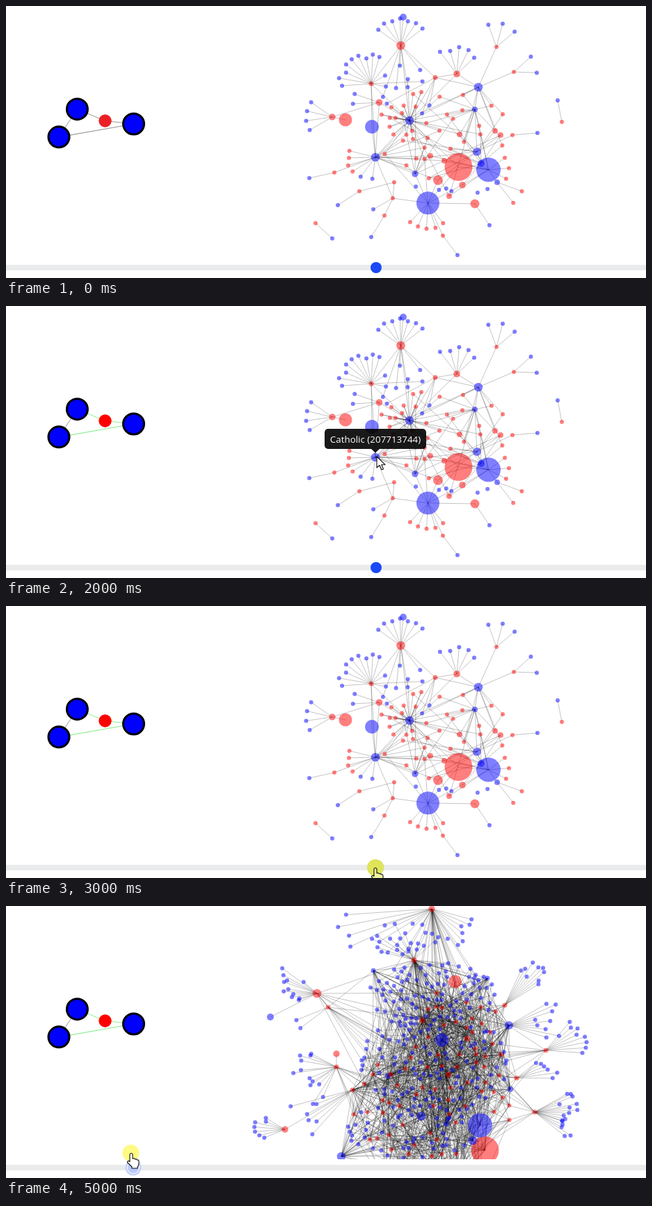
Recreate the animation shown at these times as an HTML page with a canvas. Size 920 by 392 pixels, loop 6 s.

```html
<!DOCTYPE html>
<html lang="en">
<head>
<meta charset="utf-8">
<title>Network over time</title>
<style>
html, body { margin: 0; width: 100%; height: 100%; overflow: hidden; background: #fff; }
canvas { display: block; }
</style>
</head>
<body>
<canvas id="stage" width="920" height="392"></canvas>
<script>
const ctx = document.getElementById('stage').getContext('2d');
const RED = 'rgba(255,0,0,.5)', BLUE = 'rgba(0,0,255,.5)';
const STEP = 1000, LOOP = 6000;

function seeded(seed) {
  return () => {
    seed = (seed + 0x6D2B79F5) | 0;
    let t = Math.imul(seed ^ (seed >>> 15), 1 | seed);
    t = (t + Math.imul(t ^ (t >>> 7), 61 | t)) ^ t;
    return ((t ^ (t >>> 14)) >>> 0) / 4294967296;
  };
}

const gap = (a, b) => Math.hypot(a.x - b.x, a.y - b.y);

class Graph {
  constructor(seed) {
    this.rnd = seeded(seed);
    this.nodes = [];
    this.edges = [];
  }

  dot(color, r, x, y) {
    const node = { color, r, x, y };
    this.nodes.push(node);
    return node;
  }

  link(hub, ...others) {
    for (const other of others) this.edges.push([hub, other]);
  }

  // n leaves around a hub, spread over an arc given in degrees
  fan(hub, color, n, from, to, near, far) {
    for (let i = 0; i < n; i++) {
      const jitter = n > 9 ? this.rnd() - 0.5 : 0;
      const a = (from + (to - from) * (i + jitter) / (n - 1)) * Math.PI / 180;
      const d = near + (far - near) * this.rnd();
      this.link(hub, this.dot(color, 3, hub.x + d * Math.cos(a), hub.y + d * Math.sin(a)));
    }
  }

  // n dots in an ellipse, each at the roomiest of a few random places
  cloud(color, n, cx, cy, rx, ry) {
    const place = () => {
      const a = this.rnd() * Math.PI * 2, d = Math.sqrt(this.rnd());
      const p = { x: cx + rx * d * Math.cos(a), y: cy + ry * d * Math.sin(a) };
      p.room = Math.min(...this.nodes.map(q => gap(p, q) - q.r));
      return p;
    };
    return Array.from({ length: n }, () => {
      const best = [1, 2, 3, 4].map(place).sort((a, b) => b.room - a.room)[0];
      return this.dot(color, 3, best.x, best.y);
    });
  }

  // join each node to k different hubs, close ones being likelier
  weave(nodes, hubs, k, reach) {
    for (const node of nodes) {
      const ranked = hubs.filter(h => h !== node)
        .map(h => ({ h, rank: gap(node, h) / reach + Math.log(-Math.log(this.rnd())) }))
        .sort((a, b) => a.rank - b.rank);
      this.link(node, ...ranked.slice(0, k).map(e => e.h));
    }
  }
}

function sparseGraph() {
  const g = new Graph(5);
  const top = g.dot(RED, 6.3, 567.5, 57), nw = g.dot(RED, 3.5, 525, 112), north = g.dot(RED, 4.8, 648, 98);
  const side = g.dot(RED, 4.7, 469, 160), inner = g.dot(RED, 4.8, 536.5, 139), bridge = g.dot(RED, 3.5, 617, 103);
  const ne = g.dot(RED, 3, 705, 59), ne2 = g.dot(RED, 3, 730, 95), east = g.dot(RED, 3, 728, 186);
  const coral = g.dot(RED, 9.5, 488, 164), low = g.dot(RED, 3, 556, 277), se = g.dot(RED, 6.5, 674, 285);
  const mids = [g.dot(RED, 7, 621, 251), g.dot(RED, 4.8, 656, 258), g.dot(RED, 4, 637, 274), g.dot(RED, 4, 630, 223),
    g.dot(RED, 4, 610, 216), g.dot(RED, 4, 652, 185), g.dot(RED, 4, 703, 180), g.dot(RED, 4, 711, 186)];
  const sun = g.dot(RED, 20, 650.5, 232);
  const core = g.dot(BLUE, 6.3, 580, 165), west = g.dot(BLUE, 6.3, 531, 218), right = g.dot(BLUE, 6.3, 679, 117);
  const fork = g.dot(BLUE, 4, 674, 149), knot = g.dot(BLUE, 6, 677, 210), dark = g.dot(BLUE, 5, 683, 227);
  const ball = g.dot(BLUE, 10, 526, 174), south = g.dot(BLUE, 16.5, 606.5, 284), moon = g.dot(BLUE, 17.5, 693.5, 236);
  const small = g.dot(BLUE, 4.7, 588, 242), tail = g.dot(BLUE, 4, 706, 254), tip = g.dot(BLUE, 5, 571, 16);

  g.fan(top, BLUE, 7, -145, -38, 36, 41);
  g.fan(nw, BLUE, 9, -184, -73, 37, 48);
  g.fan(north, BLUE, 5, -127, -43, 32, 41);
  g.fan(ne, BLUE, 3, -110, -40, 34, 35);
  g.fan(ne2, BLUE, 2, -42, 2, 33, 33);
  g.fan(side, BLUE, 4, 150, 215, 37, 38);
  g.fan(inner, BLUE, 2, 177, 199, 37, 38);
  g.fan(west, RED, 4, 148, 194, 37, 41);
  g.fan(west, BLUE, 2, 98, 127, 30, 36);
  g.fan(moon, RED, 3, -36, 27, 27, 30);
  g.fan(tail, RED, 2, 20, 52, 37, 38);
  g.fan(south, RED, 5, 53, 133, 36, 38);

  const strand = (from, colors, ...points) => points.reduce((prev, [x, y], i) => {
    const next = g.dot(colors[i], 3, x, y);
    if (prev) g.link(prev, next);
    return next;
  }, from);
  strand(west, [RED, BLUE], [472, 240], [436, 248]);
  strand(low, [RED, BLUE], [544, 302], [525, 333]);
  strand(low, [BLUE], [528, 293]);
  strand(low, [RED, RED, BLUE], [558, 254], [508, 267], [477, 287]);
  strand(south, [RED, BLUE], [628, 331], [649, 359]);
  strand(se, [BLUE], [695, 316]);
  strand(east, [BLUE], [764, 183]);
  strand(null, [RED, BLUE], [445, 313], [469, 335]);
  strand(null, [BLUE, RED], [793, 136], [799, 167]);

  const hubs = [core, core, west, right, fork, knot, dark, south, moon, small];
  g.weave(g.cloud(RED, 36, 630, 184, 98, 74), hubs, 2, 40);
  g.weave(g.cloud(BLUE, 12, 573, 133, 42, 58), [core, top, nw, bridge], 1, 40);
  g.cloud(BLUE, 6, 630, 262, 64, 28);
  g.weave(mids, hubs, 3, 45);
  g.link(core, top, nw, inner, bridge, sun, west, right, north);
  g.link(west, nw, ball, low, small, inner);
  g.link(nw, top, ball);
  g.link(south, low, se, sun, small);
  g.link(right, ne, ne2, north, bridge, fork);
  g.link(knot, east, fork, dark);
  g.link(top, tip, bridge);
  g.link(side, coral, inner);
  g.link(bridge, north);
  g.link(moon, fork, tail, sun);
  return g;
}

function mediumGraph() {
  const g = new Graph(24);
  const top = g.dot(RED, 4.7, 602.5, 41), nw = g.dot(RED, 6.3, 511, 84), west = g.dot(RED, 3.3, 504, 140);
  const tail = g.dot(RED, 4.7, 442, 224), mid = g.dot(RED, 4.5, 486, 170), spot = g.dot(RED, 4, 619, 142);
  const sun = g.dot(RED, 20, 663.5, 298), east = g.dot(RED, 3, 760, 263);
  const reds = [spot, g.dot(RED, 9.5, 519.5, 150), g.dot(RED, 7, 652, 306), g.dot(RED, 6.5, 693, 347),
    g.dot(RED, 4.7, 677, 309), g.dot(RED, 4, 634, 360), g.dot(RED, 4, 646, 178), g.dot(RED, 3, 460, 227)];
  const core = g.dot(BLUE, 6.3, 576, 223), sw = g.dot(BLUE, 6.3, 506, 260), ne = g.dot(BLUE, 6, 709, 152);
  const south = g.dot(BLUE, 16.5, 587.5, 341), moon = g.dot(BLUE, 17.5, 703.5, 250), ball = g.dot(BLUE, 10, 560.5, 160);
  const right = g.dot(BLUE, 3.2, 733, 211), pale = g.dot(BLUE, 5, 464, 29);
  const knots = [g.dot(BLUE, 4.7, 579, 299), g.dot(BLUE, 4.7, 681, 232), g.dot(BLUE, 5, 683, 239),
    g.dot(BLUE, 4.7, 700, 320), g.dot(BLUE, 4, 633, 238), g.dot(BLUE, 3.5, 611, 249)];

  g.fan(top, BLUE, 36, -190, 45, 34, 62);
  g.fan(nw, BLUE, 10, -160, -45, 34, 57);
  g.fan(west, BLUE, 13, 150, 232, 28, 60);
  g.fan(tail, BLUE, 7, 130, 215, 30, 46);
  g.fan(ne, RED, 5, -60, -22, 46, 60);
  g.fan(east, BLUE, 3, -16, 80, 18, 31);
  g.fan(right, BLUE, 2, -17, -32, 39, 81);
  g.fan(sw, RED, 2, 141, 176, 40, 64);
  g.fan(sw, BLUE, 3, 86, 112, 42, 98);

  const hubs = [core, core, sw, ne, south, moon, right, ...knots];
  const red = g.cloud(RED, 46, 596, 256, 116, 82);
  g.weave(red, hubs, 3, 80);
  g.weave(g.cloud(RED, 10, 640, 160, 90, 65), hubs, 2, 90);
  g.weave(g.cloud(BLUE, 46, 606, 113, 72, 43), [top, spot, core, ball, ne, west, nw], 2, 60);
  g.weave(g.cloud(BLUE, 42, 606, 236, 112, 110), [...hubs, ...reds, ...red], 2, 60);
  g.weave([top, nw, west, mid, spot, sun, ...reds], hubs, 4, 110);
  g.weave(hubs, [...hubs, ...red], 4, 110);
  g.link(tail, reds[7]);
  g.link(core, reds[7]);
  g.link(moon, east);
  g.link(nw, pale, top);
  return g;
}

function denseGraph() {
  const g = new Graph(77);
  const top = g.dot(RED, 4.7, 612, 4), crown = g.dot(RED, 4, 586.5, 78), nw = g.dot(RED, 6.3, 447, 126);
  const nw2 = g.dot(RED, 3.3, 463, 146), west = g.dot(RED, 3.5, 475, 232), sw = g.dot(RED, 4.7, 401, 322);
  const se = g.dot(RED, 3.5, 760, 297), east = g.dot(RED, 3.5, 776, 208), east2 = g.dot(RED, 3.5, 734, 248);
  const ne = g.dot(RED, 3.5, 717, 143), left = g.dot(RED, 3.3, 498, 265), spot = g.dot(RED, 4, 598.5, 165);
  const sun = g.dot(RED, 20, 688.5, 352), coral = g.dot(RED, 9.5, 645.5, 109), pink = g.dot(RED, 4.7, 475, 213);
  const ne2 = g.dot(BLUE, 6, 723, 172), ball = g.dot(BLUE, 10, 626.5, 193), moon = g.dot(BLUE, 17.5, 681.5, 316);
  const pale = g.dot(BLUE, 5, 380, 160), corner = g.dot(BLUE, 6.3, 482, 361);
  const knots = [g.dot(BLUE, 6.3, 597, 303), g.dot(BLUE, 6.3, 671, 338), g.dot(BLUE, 4.2, 549, 245),
    g.dot(BLUE, 4, 633, 314), g.dot(BLUE, 4, 725, 264), g.dot(BLUE, 3.5, 528, 93), g.dot(BLUE, 3.5, 692, 104),
    g.dot(RED, 4, 636, 243), g.dot(RED, 4, 663, 191), g.dot(RED, 3.5, 712, 214), g.dot(RED, 3.5, 553, 243)];
  // these lie under the lower edge of the plot
  const below = g.cloud(BLUE, 8, 620, 400, 90, 16);

  g.fan(top, BLUE, 4, 155, 176, 100, 146);
  g.fan(top, BLUE, 7, 15, 62, 28, 88);
  g.fan(nw, BLUE, 11, 160, 222, 25, 62);
  g.fan(nw2, BLUE, 2, 143, 158, 49, 50);
  g.fan(west, BLUE, 12, 118, 212, 32, 70);
  g.fan(sw, BLUE, 7, 158, 211, 28, 49);
  g.fan(left, BLUE, 6, 132, 165, 55, 95);
  g.fan(ne, BLUE, 9, -65, -32, 48, 80);
  g.fan(ne2, BLUE, 9, -30, 18, 38, 76);
  g.fan(east, BLUE, 8, -50, 4, 42, 60);
  g.fan(east2, BLUE, 6, -38, 0, 24, 63);
  g.fan(se, BLUE, 16, -30, 38, 35, 68);

  const hubs = [spot, ball, crown, ne2, moon, sun, left, corner, ...knots, ...below];
  const red = [...g.cloud(RED, 48, 612, 290, 118, 82), ...g.cloud(RED, 22, 650, 175, 72, 68)];
  const all = [...hubs, ...red];
  g.weave(red, [...hubs, ...below], 5, 110);
  g.weave(g.cloud(BLUE, 26, 574, 48, 50, 25), [crown, top], 1, 60);
  g.weave(g.cloud(BLUE, 78, 612, 130, 92, 50), [...all, top, crown, spot], 3, 65);
  g.weave(g.cloud(BLUE, 100, 615, 228, 108, 78), all, 3, 75);
  g.weave(g.cloud(BLUE, 44, 590, 322, 105, 44), all, 3, 75);
  g.weave([...hubs, coral], all, 6, 120);
  g.weave([top, crown, spot, ball], all, 22, 160);
  g.weave([nw, nw2, west, left, east, east2, se, ne, ne2, corner], all, 9, 110);
  g.link(nw, nw2, pale);
  g.link(west, pink);
  g.link(left, sw);
  return g;
}

function disc(x, y, r, fill, stroke, width) {
  ctx.beginPath();
  ctx.arc(x, y, r, 0, Math.PI * 2);
  ctx.fillStyle = fill;
  ctx.fill();
  if (stroke) {
    ctx.strokeStyle = stroke;
    ctx.lineWidth = width;
    ctx.stroke();
  }
}

function line(a, b, color, width) {
  ctx.beginPath();
  ctx.moveTo(a.x, a.y);
  ctx.lineTo(b.x, b.y);
  ctx.strokeStyle = color;
  ctx.lineWidth = width;
  ctx.stroke();
}

function drawGraph({ nodes, edges }) {
  ctx.save();
  ctx.beginPath();
  ctx.rect(300, 0, 620, 365);
  ctx.clip();
  for (const [a, b] of edges) line(a, b, 'rgba(0,0,0,.34)', 0.7);
  for (const n of nodes) disc(n.x, n.y, n.r, n.color);
  ctx.restore();
}

function drawSmallNet(active) {
  const a = { x: 102.4, y: 148.7 }, b = { x: 76, y: 188.8 }, c = { x: 183.5, y: 170 }, m = { x: 142.5, y: 165.5 };
  const hot = active ? '#90ee90' : '#999';
  line(a, b, '#999', 1);
  line(a, m, hot, 1);
  line(m, c, hot, 1);
  line(b, c, hot, 1.2);
  for (const p of [a, b, c]) disc(p.x, p.y, 15, '#00f', '#000', 3);
  disc(m.x, m.y, 9.2, active ? '#f00' : '#ec2024');
}

function drawTip({ x, y, w, text, arrow }) {
  ctx.fillStyle = 'rgba(0,0,0,.9)';
  ctx.beginPath();
  ctx.roundRect(x, y, w, 29, 5);
  ctx.fill();
  ctx.fill(new Path2D(arrow));
  ctx.fillStyle = '#fff';
  ctx.font = '13.4px "Open Sans", sans-serif';
  ctx.textAlign = 'center';
  ctx.fillText(text, x + w / 2, y + 20);
}

const ARROW = new Path2D('M0 0V16L4 12.5L7 19L9.5 18L6.8 11.7H12Z');
const HAND = new Path2D('M-2 2Q0 -1.5 2 2V8Q4 7 5.500 9Q7.500 8 8.500 10Q11 9.500 11 12V15Q11 18 9 20V22H1V20Q-2 17 -5.500 13.500Q-5.500 11 -3 11.500L-2 12.500Z');

function drawCursor(shape, x, y, fill = '#fff') {
  ctx.save();
  ctx.translate(x, y);
  ctx.fillStyle = fill;
  ctx.strokeStyle = '#111';
  ctx.lineWidth = 1.1;
  ctx.lineJoin = 'round';
  ctx.fill(shape);
  ctx.stroke(shape);
  ctx.restore();
}

function drawSlider(x, pressed) {
  ctx.fillStyle = '#e9ebed';
  ctx.fillRect(0, 373, 920, 8);
  if (pressed) {
    disc(x, 377, 11.5, '#c6d1f8');
    disc(x, 377, 9, '#fff');
  }
  disc(x, 377, 8, pressed ? '#b9c7fa' : '#1a49f5');
}

const sparse = sparseGraph(), medium = mediumGraph(), dense = denseGraph();
const scenes = [
  { graph: sparse, knob: 532 },
  { graph: sparse, knob: 532, arrow: [191, 167],
    tip: { x: 92, y: 156, w: 71, text: 'VELIR (5)', arrow: 'M163 164.5L168.5 170.5L163 176.5Z' } },
  { graph: sparse, knob: 532, active: true, arrow: [533, 217],
    tip: { x: 458, y: 177, w: 146, text: 'Catholic (207713744)', arrow: 'M525 206L531 211.5L537 206Z' } },
  { graph: sparse, knob: 532, active: true, pressed: true, glow: [531, 377, '#dfe458'], hand: [531, 377, '#f0f3a0'] },
  { graph: medium, knob: 403, active: true, pressed: true, glow: [392, 360, '#fffa82'], hand: [393, 361] },
  { graph: dense, knob: 183, active: true, pressed: true, glow: [179.5, 356, '#fffa82'], hand: [180, 356] }
];

function drawScene(s) {
  ctx.fillStyle = '#fff';
  ctx.fillRect(0, 0, 920, 392);
  drawSmallNet(s.active);
  drawGraph(s.graph);
  drawSlider(s.knob, s.pressed);
  if (s.tip) drawTip(s.tip);
  if (s.glow) disc(s.glow[0], s.glow[1], 12, s.glow[2]);
  if (s.arrow) drawCursor(ARROW, ...s.arrow);
  if (s.hand) drawCursor(HAND, ...s.hand);
}

const start = performance.now();
let shown = -1;
function tick() {
  const step = Math.floor(((performance.now() - start) % LOOP) / STEP);
  if (step !== shown) drawScene(scenes[shown = step]);
  requestAnimationFrame(tick);
}
tick();
</script>
</body>
</html>
```
